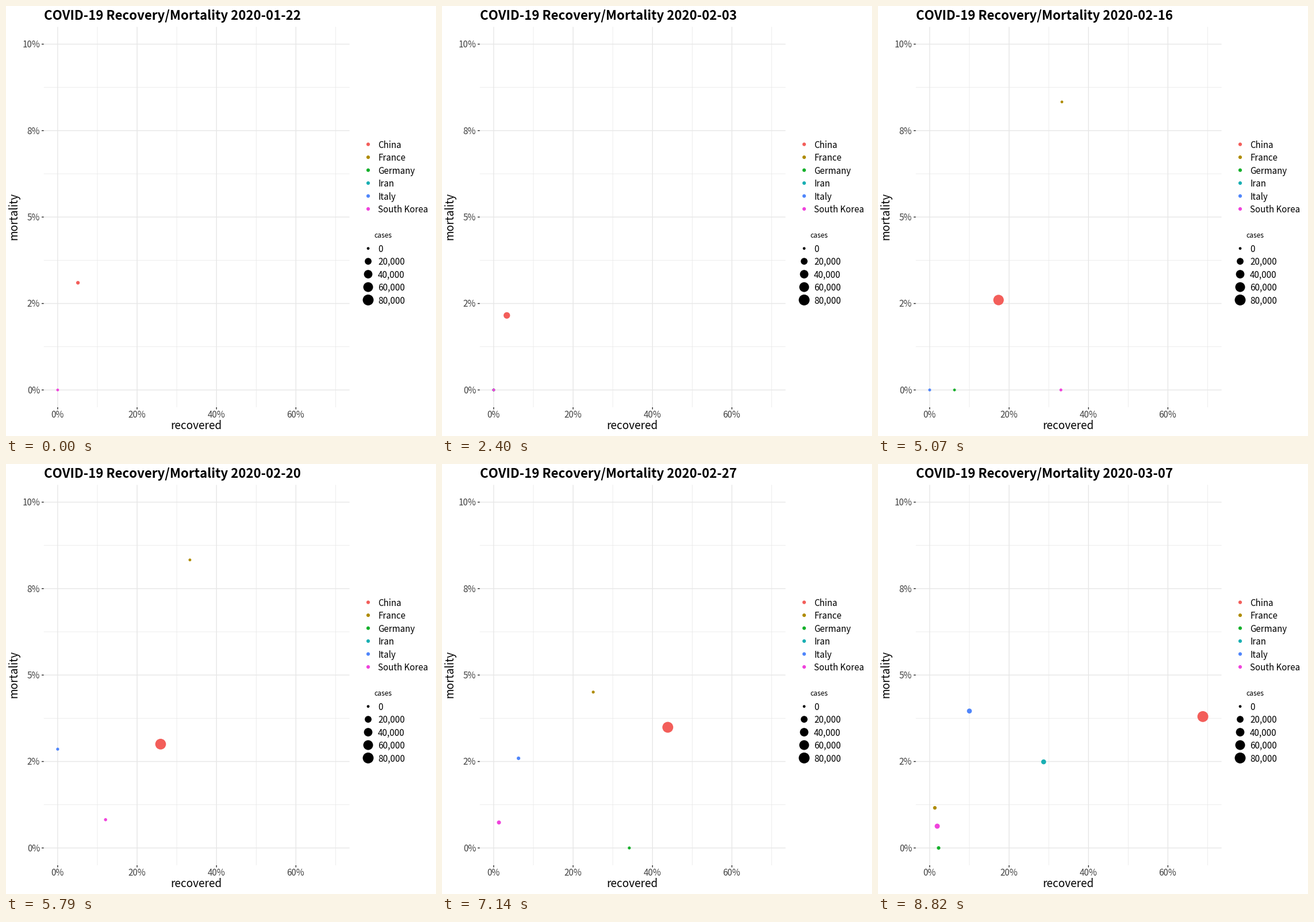
Write a matplotlib script that moves like this. It is 748 by 748 pixels and loops after 9000 ms.

```python
import matplotlib.pyplot as plt
import numpy as np
from matplotlib.animation import FuncAnimation
from matplotlib.patches import Circle

SIZE, DPI = 748, 100
DAYS, LAST, FRAMES = 45, 294, 300
START = np.datetime64("2020-01-22")
MAX_CASES = 80770

# panel geometry in pixels
X0, PX = 89.9, 6.907      # 0 % and pixels per percent
Y0, PY = 667.9, 60.15
LEFT, RIGHT = X0 - 3.5 * PX, X0 + 73.5 * PX
TOP, BOTTOM = Y0 - 10.5 * PY, Y0 + 0.5 * PY
GRID, TICK, LABEL = "#e7e7e7", "#2b2b2b", "#414141"

# name: colour, logistic case growth (total, middle day, scale in days),
# then one path of (day, recovered %, mortality %) per visible stretch
COUNTRIES = {
    "China": ("#f35e5a", (MAX_CASES, 17.3, 3.9), [
        [(0, 5.1, 3.1), (5, 2, 2.85), (7, 2, 2.18), (12, 3.1, 2.16),
         (16, 5.9, 2.1), (20, 10.4, 2.5), (22, 10.4, 2.28), (25, 15.2, 2.5),
         (31, 29.5, 3.17), (33, 32.4, 3.36), (39, 52.7, 3.59),
         (43, 64.9, 3.74), (45, 68.8, 3.8)]]),
    "France": ("#af8c05", (1900, 45, 2.6), [
        [(2, 0, 0), (20, 0, 0), (21, 18.2, 0), (23, 18.2, 0),
         (24, 33.3, 8.33), (33, 33.3, 8.33), (34, 28.6, 7.14)],
        [(36, 29, 5.26), (38, 12, 2), (39, 9.2, 1.54), (41, 5.9, 1.75),
         (45, 1.3, 1.16)]]),
    "Germany": ("#15b02b", (1600, 45, 2.9), [
        [(5, 0, 0), (21, 0, 0), (22, 6.25, 0), (26, 6.25, 0)],
        [(35, 55.6, 0), (36, 34.8, 0), (37, 33.3, 0), (39, 12.3, 0),
         (40, 10, 0), (43, 3.3, 0), (45, 2.25, 0)]]),
    "Iran": ("#1aafb3", (7500, 42.6, 1.9), [
        [(37, 18.8, 8.76), (39, 17.9, 5.52), (40, 19.4, 4.4),
         (41, 12.5, 3.3), (42, 18.9, 3.15), (44, 19.2, 2.61),
         (45, 28.7, 2.49)]]),
    "Italy": ("#5086fb", (12000, 45, 3.2), [
        [(9, 0, 0), (29, 0, 0), (30, 0, 5), (32, 1.3, 1.94), (33, 0.4, 3.06),
         (35, 0.7, 2.65), (36, 6.9, 2.6), (38, 4.1, 2.57), (39, 4.9, 2),
         (41, 6.9, 3.1), (44, 11.3, 4.25), (45, 10, 3.96)]]),
    "South Korea": ("#f043dc", (7600, 39, 2.6), [
        [(0, 0, 0), (15, 0, 0), (18, 12, 0), (20, 10.7, 0), (21, 25, 0),
         (26, 33.3, 0), (28, 38.7, 0), (29, 15.4, 0.96), (31, 3.7, 0.46),
         (32, 3, 1), (35, 1.7, 0.95), (38, 0.9, 0.5), (40, 0.7, 0.65),
         (45, 1.9, 0.63)]]),
}


def radius(size):
    """Point size in mm to pixel radius, outline included."""
    return (0.375 * (size * 2.845 + 0.945) + 0.354) * 4 / 3


def case_radius(cases):
    return radius(1 + 5 * np.sqrt(cases / MAX_CASES))


def cases_on(day, total, mid, scale):
    return total / (1 + np.exp((mid - day) / scale))


def locate(spans, f):
    """Pixel position on the path that covers step f, or None."""
    for span in spans:
        day, rec, mort = np.transpose(span)
        keys = np.round(day * LAST / DAYS)
        if keys[0] <= f < keys[-1] or f == keys[-1] == LAST:
            return (X0 + PX * np.interp(f, keys, rec),
                    Y0 - PY * np.interp(f, keys, mort))
    return None


fig = plt.figure(figsize=(SIZE / 100, SIZE / 100), dpi=DPI, facecolor="white")
ax = fig.add_axes([0, 0, 1, 1])
ax.set(xlim=(0, SIZE), ylim=(SIZE, 0))
ax.axis("off")


def text(x, y, s, px, color="black", **kw):
    return ax.text(x, y, s, fontsize=px * 72 / DPI, color=color,
                   va="baseline", family="Noto Sans CJK JP", **kw)


def line(x1, y1, x2, y2, px, color):
    ax.plot([x1, x2], [y1, y2], lw=px * 72 / DPI, color=color, snap=False,
            solid_capstyle="butt", zorder=1)


def dot(x, y, r, color):
    return ax.add_patch(Circle((x, y), r, fc=color, lw=0, zorder=3))


for p in range(10, 80, 20):
    line(X0 + p * PX, TOP, X0 + p * PX, BOTTOM, 0.75, GRID)
for p in np.arange(1.25, 10, 2.5):
    line(LEFT, Y0 - p * PY, RIGHT, Y0 - p * PY, 0.75, GRID)
for p in range(0, 80, 20):
    x = X0 + p * PX
    line(x, TOP, x, BOTTOM, 1.42, GRID)
    line(x, BOTTOM, x, BOTTOM + 3.67, 1.42, TICK)
    text(x - 0.4, 716.2, f"{p}%", 15.15, LABEL, ha="center")
for p in np.arange(0, 11, 2.5):
    y = Y0 - p * PY
    line(LEFT, y, RIGHT, y, 1.42, GRID)
    line(LEFT - 3.67, y, LEFT, y, 1.42, TICK)
    text(59.2, y + 5.9, f"{p:.0f}%", 15.15, LABEL, ha="right")

text(331, 736.5, "recovered", 19.05, ha="center")
text(19.6, 366.3, "mortality", 19.05, ha="center", rotation=90,
     rotation_mode="anchor")
title = text(LEFT, 23.6, "", 22.28, weight="bold")

for i, (name, (color, *_)) in enumerate(COUNTRIES.items()):
    y = 240.6 + 22.48 * i
    dot(630, y, radius(1.5), color)
    text(647.2, y + 6.1, name, 15.1)
text(640.7, 402.6, "cases", 12)
for i in range(5):
    y = 421.7 + 22.42 * i
    dot(630, y, case_radius(20000 * i), "black")
    text(647.2, y + 6.1, f"{20000 * i:,}", 15.25)

dots = [dot(X0, Y0, 2, color) for color, *_ in COUNTRIES.values()]


def update(frame):
    f = min(frame, LAST)
    title.set_text("COVID-19 Recovery/Mortality "
                   f"{START + f * DAYS // LAST}")
    for d, (_, growth, spans) in zip(dots, COUNTRIES.values()):
        pos = locate(spans, f)
        d.set_visible(pos is not None)
        if pos is not None:
            d.center = pos
            d.set_radius(case_radius(cases_on(f * DAYS / LAST, *growth)))
    return [title, *dots]


anim = FuncAnimation(fig, update, frames=FRAMES, interval=30, repeat=True,
                     repeat_delay=0, blit=False)
plt.show()
```
